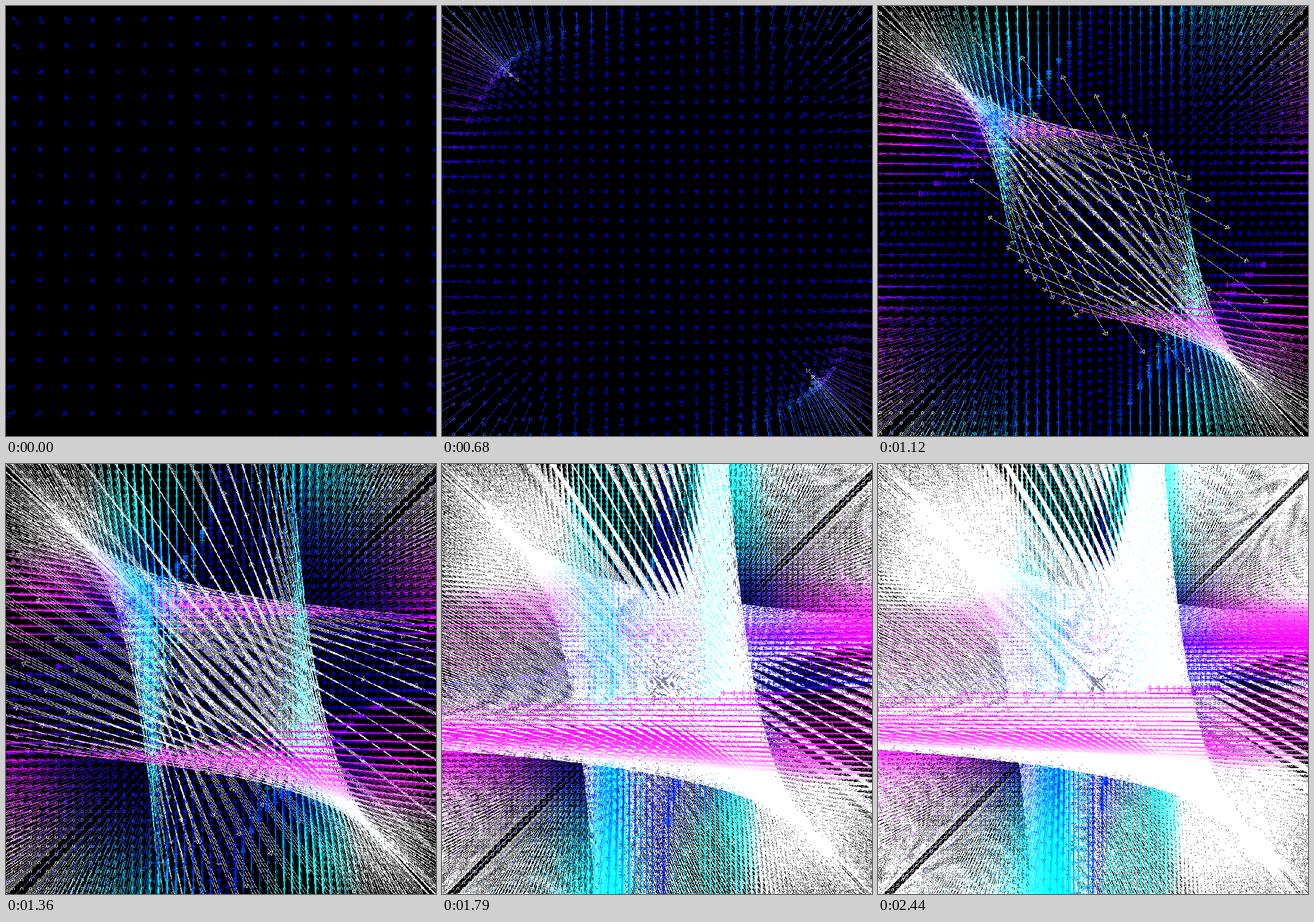
Write an HTML page with a canvas that moves like this. It is 748 px wide and 748 px high and loops after 2.66 s.

```html
<!DOCTYPE html>
<html lang="en">
<head>
<meta charset="utf-8">
<title>Vector field</title>
<style>
html, body { margin: 0; width: 100%; height: 100%; overflow: hidden; background: #000; }
canvas { display: block; width: 748px; height: 748px; }
</style>
</head>
<body>
<canvas id="stage" width="748" height="748"></canvas>
<script>
// The field is plotted on a 900 px plane, then shrunk to the stage
const OUT = 748, SIZE = 900, MID = 460, REACH = 500, LOOP = 2660;
const PITCH = 55, ZOOM = 1.1, GAIN = 6.18e-6;

// Start time of every zoom step; the last four are half steps
const TIMES = [0, 100, 220, 330, 440, 560, 680, 780, 880, 1000, 1120, 1240,
  1360, 1460, 1560, 1670, 1790, 1890, 2000, 2120, 2230];
const FULL_STEPS = 16;

const ctx = document.getElementById('stage').getContext('2d');
const plane = new Uint32Array(SIZE * SIZE);
const cache = [];

// Whole-pixel steps, cut towards zero, so the grid is wider before the axis
function axis(pitch) {
  const list = [];
  for (let v = -REACH; v <= REACH; v = Math.trunc(v + pitch)) list.push(v);
  return list;
}

function dot(x, y, color) {
  if (x >= 0 && y >= 0 && x < SIZE && y < SIZE) plane[y * SIZE + x] = color;
}

// Hard-edged line, cut to the plane first
function line(x0, y0, x1, y1, color) {
  x0 = Math.trunc(x0) + 0.5;
  y0 = Math.trunc(y0) + 0.5;
  x1 = Math.trunc(x1) + 0.5;
  y1 = Math.trunc(y1) + 0.5;
  const dx = x1 - x0, dy = y1 - y0;
  let t0 = 0, t1 = 1;
  for (const [p, d] of [[x0, dx], [y0, dy]]) {
    if (d === 0) {
      if (p < 0 || p > SIZE) return;
      continue;
    }
    const a = -p / d, b = (SIZE - p) / d;
    t0 = Math.max(t0, Math.min(a, b));
    t1 = Math.min(t1, Math.max(a, b));
  }
  if (t0 > t1) return;
  let x = x0 + dx * t0, y = y0 + dy * t0;
  const w = dx * (t1 - t0), h = dy * (t1 - t0);
  const n = Math.max(1, Math.ceil(Math.max(Math.abs(w), Math.abs(h))));
  const sx = w / n, sy = h / n;
  for (let i = 0; i <= n; i++, x += sx, y += sy) dot(Math.floor(x), Math.floor(y), color);
}

function ring(x, y, color) {
  for (let i = -1; i <= 2; i++) {
    dot(x + i, y - 2, color);
    dot(x + i, y + 3, color);
    dot(x - 2, y + i, color);
    dot(x + 3, y + i, color);
  }
}

function arrow(x, y, u, v) {
  const r = Math.min(255, Math.abs(u)) | 0, g = Math.min(255, Math.abs(v)) | 0;
  const color = (0xffff0000 | g << 8 | r) >>> 0;
  const len = Math.hypot(u, v) || 1, cx = u / len, cy = v / len;
  const ex = x + u, ey = y + v;
  const tx = ex + 4 * cx, ty = ey + 4 * cy;
  const bx = ex - 3 * cx, by = ey - 3 * cy;
  const wx = -5 * cy, wy = 5 * cx;
  ring(x, y, color);
  line(x, y, ex, ey, color);
  line(tx, ty, bx + wx, by + wy, color);
  line(tx, ty, bx - wx, by - wy, color);
  line(bx + wx, by + wy, bx - wx, by - wy, color);
}

function shrink() {
  const image = ctx.createImageData(OUT, OUT);
  const px = new Uint32Array(image.data.buffer);
  const at = i => Math.floor((i + 0.5) * SIZE / OUT);
  for (let y = 0; y < OUT; y++) {
    const row = at(y) * SIZE;
    for (let x = 0; x < OUT; x++) px[y * OUT + x] = plane[row + at(x)];
  }
  return image;
}

function render(step) {
  const zoom = Math.min(step, (step + FULL_STEPS) / 2);
  const pitch = PITCH / ZOOM ** zoom;
  const k = GAIN / pitch ** 4;
  const grid = axis(pitch);
  plane.fill(0xff000000);
  for (const x of grid) {
    for (const y of grid) {
      arrow(MID + x, MID - y, k * x ** 4 * y, -k * y ** 4 * x);
    }
  }
  return shrink();
}

let start = null, shown = -1;
function tick(now) {
  if (start === null) start = now;
  const t = (now - start) % LOOP;
  let step = TIMES.length - 1;
  while (TIMES[step] > t) step--;
  if (step !== shown) {
    cache[step] = cache[step] || render(step);
    ctx.putImageData(cache[step], 0, 0);
    shown = step;
  }
  requestAnimationFrame(tick);
}
requestAnimationFrame(tick);
</script>
</body>
</html>
```
